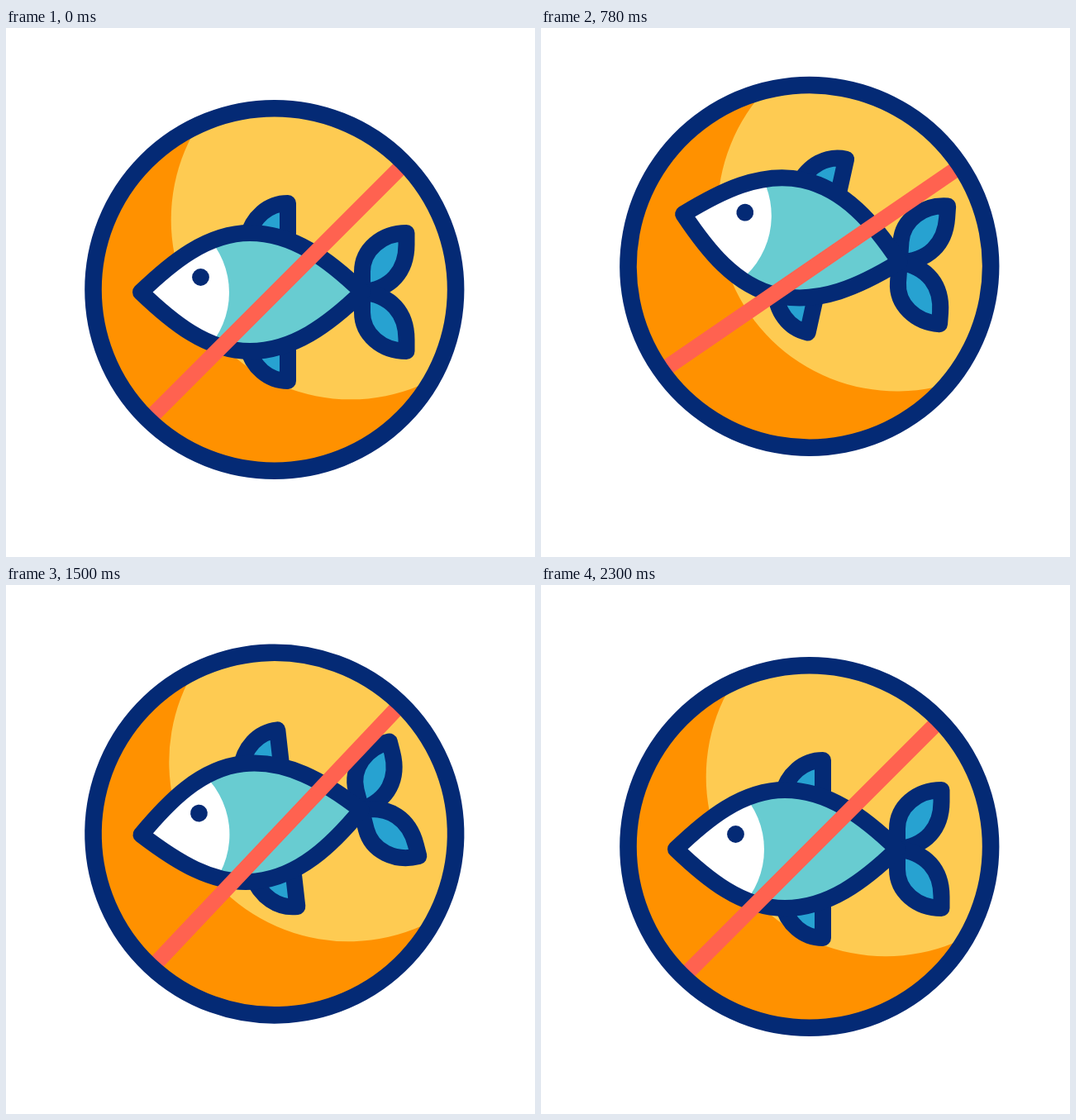
An HTML page with a canvas for the animation above (2.4 s loop, 640 by 640 pixels).

```html
<!DOCTYPE html>
<html lang="en">
<head>
<meta charset="utf-8">
<title>No fish</title>
<style>
html, body { margin: 0; width: 100%; height: 100%; overflow: hidden; background: #fff; }
canvas { display: block; width: 640px; height: 640px; }
</style>
</head>
<body>
<canvas id="stage" width="640" height="640"></canvas>
<script>
const ctx = document.getElementById("stage").getContext("2d");
const LOOP = 2400;
const NAVY = "#042a75", ORANGE = "#ff9100", YELLOW = "#fecb52";
const TEAL = "#68ccd1", BLUE = "#27a2d1", RED = "#ff6250";
const CENTER = [324.8, 316.5], BODY = [294, 319.5], JOINT = [431, 319.5];

const body = new Path2D("M163 319.5C200 284 243 248 295 248S390 280 431 319.5C390 359 347 391 295 391S200 355 163 319.5Z");
const fin = new Path2D("M291 256C298 228 318 212 341 212V262Z");
const lobe = new Path2D("M431 319.5V295C431 268 455 248 484.5 248V262C484.5 294 466 316 431 319.5Z");

// A sine-eased swing from rest: the first peak comes at `first` ms,
// the others follow every `step` ms, and it ends at rest.
function swing(first, step, ...peaks) {
  return t => {
    const phase = t < first ? t / first : 1 + (t - first) / step;
    const i = Math.floor(phase);
    const from = peaks[i - 1] || 0, to = peaks[i] || 0;
    return from + (to - from) * (1 - Math.cos(Math.PI * (phase - i))) / 2;
  };
}

const badgeY = swing(365, 349, 53.5, -36, 53, -21, 15.5);
const badgeTurn = swing(320, 490, -13.5, 10.8, -4.2, 3);
const fishY = swing(450, 350, 40, -33.3, 48, -17.5, 7);
const fishTurn = swing(250, 325, -6.5, 10, -1.5, 8.6, -5.6, 5.2);
const tailTurn = swing(100, 347, -7, 7, -8.5, 13, -8, 1.3);

function turn([x, y], degrees) {
  ctx.translate(x, y);
  ctx.rotate(degrees * Math.PI / 180);
  ctx.translate(-x, -y);
}

function disc(x, y, r, color) {
  ctx.beginPath();
  ctx.arc(x, y, r, 0, Math.PI * 2);
  ctx.fillStyle = color;
  ctx.fill();
}

function outlined(path, color) {
  ctx.fillStyle = color;
  ctx.fill(path);
  ctx.stroke(path);
}

// Draws a path and its reflection in the fish's long axis.
function mirrored(path, color) {
  outlined(path, color);
  ctx.save();
  ctx.translate(0, 2 * BODY[1]);
  ctx.scale(1, -1);
  outlined(path, color);
  ctx.restore();
}

function drawFish(t) {
  ctx.save();
  ctx.translate(0, fishY(t));
  turn(BODY, fishTurn(t));
  ctx.strokeStyle = NAVY;
  ctx.lineWidth = 20;
  ctx.lineJoin = "round";

  ctx.save();
  turn(JOINT, tailTurn(t));
  mirrored(lobe, BLUE);
  ctx.restore();

  mirrored(fin, BLUE);

  ctx.save();
  ctx.clip(body);
  ctx.fillStyle = TEAL;
  ctx.fillRect(150, 240, 290, 160);
  disc(170, 320, 100, "#fff");
  ctx.restore();
  ctx.stroke(body);
  disc(235.5, 301.5, 10.4, NAVY);
  ctx.restore();
}

function drawBadge(t) {
  const [cx, cy] = CENTER;
  ctx.save();
  ctx.translate(0, badgeY(t));
  turn(CENTER, badgeTurn(t));

  disc(cx, cy, 219, ORANGE);
  ctx.save();
  ctx.clip();
  disc(417, 232, 217.3, YELLOW);
  ctx.restore();

  drawFish(t);

  ctx.beginPath();
  ctx.moveTo(175, 471);
  ctx.lineTo(480, 166);
  ctx.strokeStyle = RED;
  ctx.lineWidth = 19;
  ctx.stroke();

  ctx.beginPath();
  ctx.arc(cx, cy, 219.3, 0, Math.PI * 2);
  ctx.strokeStyle = NAVY;
  ctx.lineWidth = 20.6;
  ctx.stroke();
  ctx.restore();
}

const start = performance.now();
function frame() {
  ctx.fillStyle = "#fff";
  ctx.fillRect(0, 0, 640, 640);
  drawBadge((performance.now() - start) % LOOP);
  requestAnimationFrame(frame);
}
frame();
</script>
</body>
</html>
```
